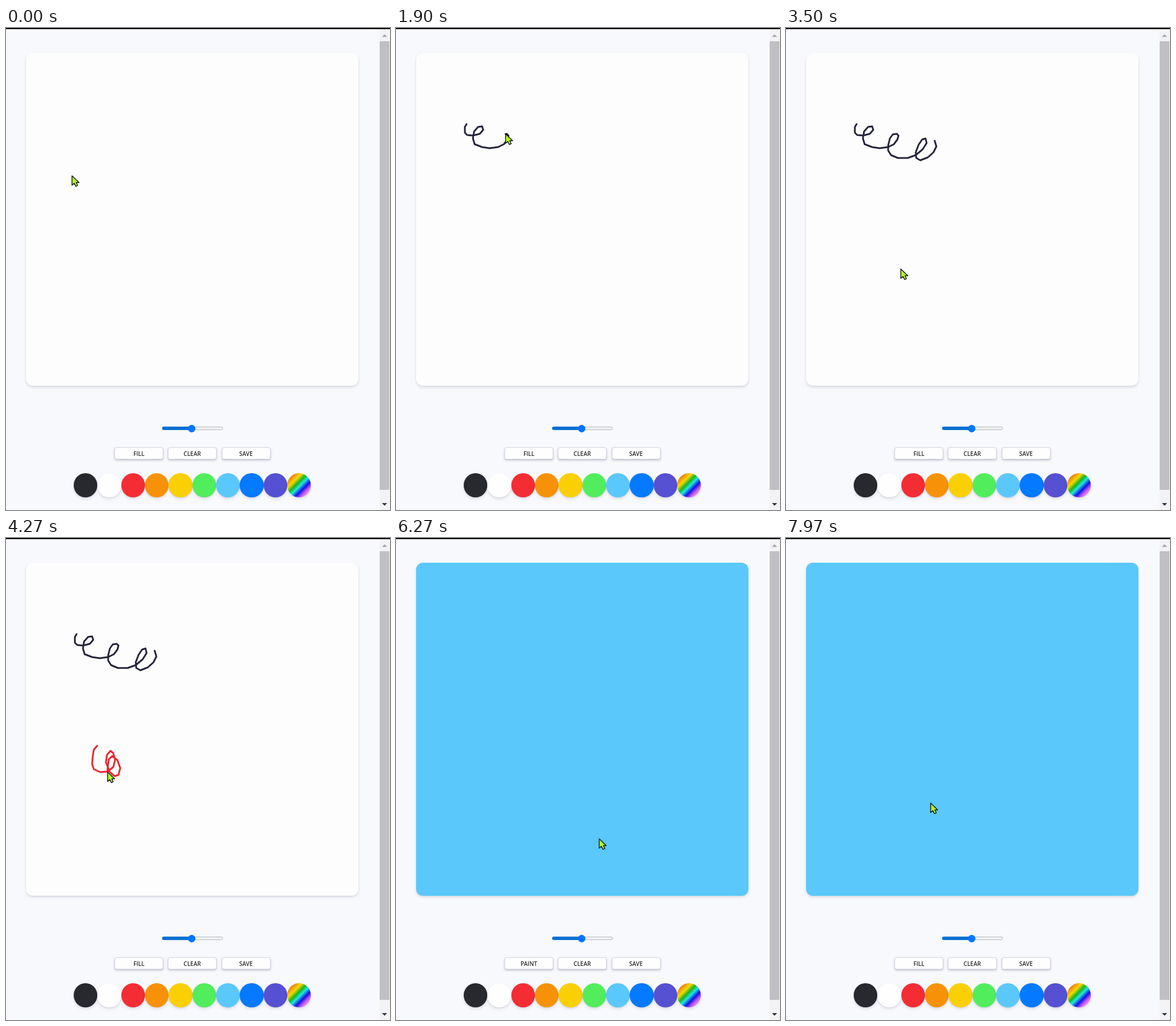
These frames come from a looping animation (669x838 px, 8000 ms). An HTML page:

```html
<!DOCTYPE html>
<html lang="en">
<head>
<meta charset="utf-8">
<title>Paint board</title>
<style>
  html, body { margin: 0; width: 100%; height: 100%; overflow: hidden; background: #f8f9fc; }
  body { position: relative; font: 600 10px/20px "Open Sans", "Noto Sans", sans-serif; color: #2c2c2c; }
  body * { box-sizing: border-box; }
  body > * { position: absolute; }
  .top { left: 0; top: 0; width: 669px; height: 1.5px; background: #050508; }
  .board, .swatch { box-shadow: 0 3px 5px rgba(50,50,93,.11), 0 1px 2.5px rgba(0,0,0,.08); }
  .board { left: 35px; top: 43px; width: 579px; height: 578.5px; border-radius: 12px; background: #fdfdfd; }
  .button { top: 729px; width: 85px; height: 21px; border: 1px solid #d5d5e2; border-radius: 4px;
    background: #fefefe; text-align: center; box-shadow: 0 2px 4px rgba(50,50,93,.2), 0 1px 2px rgba(0,0,0,.1); }
  .swatch { top: 774.3px; width: 41.3px; height: 41.3px; border-radius: 50%; }
  .track { left: 272px; top: 693px; width: 106px; height: 6px; border: 1px solid #bcbcc4; border-radius: 3px;
    background: #efefef; }
  .done { left: 272px; top: 693px; width: 52px; height: 6px; border-radius: 3px; background: #0870d0; }
  .knob { left: 317px; top: 689.5px; width: 13px; height: 13px; border-radius: 50%; background: #0075ff; }
  .bar { left: 651px; top: 1.5px; width: 18px; height: 837px; background: #f3f3f5; }
  .thumb { left: 651px; top: 23px; width: 17px; height: 780px; background: #c0c0c4; }
  svg { left: 0; top: 0; }
  polyline { fill: none; stroke-width: 3; stroke-linecap: round; stroke-linejoin: round; }
  .pointer { fill: #b6f52a; stroke: #101418; stroke-width: 1.4; stroke-linejoin: round; }
</style>
</head>
<body>
<div class="top"></div>
<div class="board" id="board"></div>
<div class="track"></div><div class="done"></div><div class="knob"></div>
<div class="button" id="mode" style="left:189px">FILL</div>
<div class="button" style="left:282px">CLEAR</div>
<div class="button" style="left:375.5px">SAVE</div>
<div class="bar"></div><div class="thumb"></div>
<svg width="669" height="838">
  <path d="M655 15.5L659.5 11L664 15.5Z" fill="#a5a3b0"/>
  <path d="M655 826L659.5 830.5L664 826Z" fill="#303038"/>
  <g id="ink">
    <polyline id="black" pathLength="1" stroke="#24243a" points="123,167 120,172 120,182 124,186 134,187 146,184 152,177 150,171 143,172 136,180 134,192 137,202 150,207 163,209 178,207 188,202 194,194 196,187 193,184 186,185 181,192 178,204 178,213 183,221 195,226 212,226 226,221 238,211 245,200 243,192 237,194 231,203 226,216 227,226 234,230 247,225 257,216 262,206 259,196"/>
    <polyline id="red" pathLength="1" stroke="#e8252d" points="159,361 153,368 151,380 150,393 153,402 164,407 177,406 187,398 190,386 187,374 182,370 176,377 174,390 181,407 189,414 196,412 199,400 194,386 185,379 179,385 177,400 177,413 181,423 188,429 208,430 218,424 226,414 225,404 220,404 216,412 217,422 224,425 243,423"/>
  </g>
  <g id="cursor" class="pointer">
    <path id="arrow" d="M0 0V16.3L3.8 12.9L6.5 18.3L9.8 16.8L7.3 11.7H12.3Z"/>
    <path id="hand" d="M-2 1.5Q-2 0 -.3 0T1.7 1.5V7Q4 5.8 4.7 7.6Q7 6.6 7.6 8.6Q9.6 8 9.6 10.2V15L7.5 18V20.6H-1V18L-5.6 12.4Q-6.6 10.5 -4.7 10L-2 12ZM1.7 7V11M4.7 7.6V11M7.6 8.6V11.5"/>
  </g>
</svg>
<script>
const LOOP = 8000;
const byId = id => document.getElementById(id);

const rainbow = "linear-gradient(135deg,#f08a10 18%,#f6d900 31%,#18b420 43%,#20e8e0 53%,#1510e8 66%,#c45cf0 77%,#ffb0e0 90%)";
["#28282f", "#fefefe", "#f42d34", "#f79208", "#fad004", "#52ed5c", "#5ac8fa", "#0579ff", "#5650d2", rainbow]
  .forEach((paint, i) => {
    const dot = document.createElement("div");
    dot.className = "swatch";
    dot.style.left = 118 + i * 41.35 + "px";
    dot.style.background = paint;
    document.body.insertBefore(dot, document.querySelector("svg"));
  });

// Pen progress as [time, share of the line]
const strokes = [
  { line: byId("black"), steps: [[1100, 0], [1900, .44], [2740, 1]] },
  { line: byId("red"), steps: [[3740, 0], [4560, 1]] }
];

// Free pointer moves as [time, x, y]
const moves = [
  [0, 115, 257], [250, 116, 248], [770, 125, 168], [1100, 123, 167],
  [2740, 259, 196], [3080, 222, 792], [3200, 221, 790], [3500, 200, 419], [3740, 159, 361],
  [4560, 243, 423], [4700, 250, 480], [5110, 250, 741], [5300, 240, 740],
  [5620, 387, 792], [5740, 387, 790], [6040, 350, 535], [6270, 354, 523], [6450, 350, 540],
  [6850, 238, 740], [7060, 236, 739], [7500, 248, 490], [7970, 252, 461], [LOOP, 252, 461]
];

const ease = k => k * k * (3 - 2 * k);

function sample(steps, t, curve = k => k) {
  if (t <= steps[0][0]) return steps[0].slice(1);
  const i = steps.findIndex(step => step[0] > t);
  if (i < 0) return steps[steps.length - 1].slice(1);
  const [a, b] = [steps[i - 1], steps[i]];
  const k = curve((t - a[0]) / (b[0] - a[0]));
  return a.slice(1).map((v, n) => v + (b[n + 1] - v) * k);
}

function render(t) {
  let [x, y] = sample(moves, t, ease);
  for (const { line, steps } of strokes) {
    const [share] = sample(steps, t);
    line.style.display = share > 0 ? "" : "none";
    line.style.strokeDasharray = share >= 1 ? "none" : `${share} 2`;
    if (share > 0 && share < 1) {
      const tip = line.getPointAtLength(share * line.getTotalLength());
      x = tip.x;
      y = tip.y;
    }
  }
  const filled = t >= 6060;
  byId("board").style.background = filled ? "#5ac8fa" : "#fdfdfd";
  byId("ink").style.display = filled ? "none" : "";
  byId("mode").textContent = t >= 5260 && t < 7000 ? "PAINT" : "FILL";

  const onButton = y > 729 && y < 750 && x > 189 && x < 460;
  const onSwatch = y > 774 && y < 816 && x > 118 && x < 531;
  const pressing = onButton || onSwatch;
  byId("arrow").style.display = pressing ? "none" : "";
  byId("hand").style.display = pressing ? "" : "none";
  byId("cursor").setAttribute("transform", `translate(${x} ${y})`);
}

const start = performance.now();
function tick(now) {
  render(Math.max(0, now - start) % LOOP);
  requestAnimationFrame(tick);
}
render(0);
requestAnimationFrame(tick);
</script>
</body>
</html>
```
